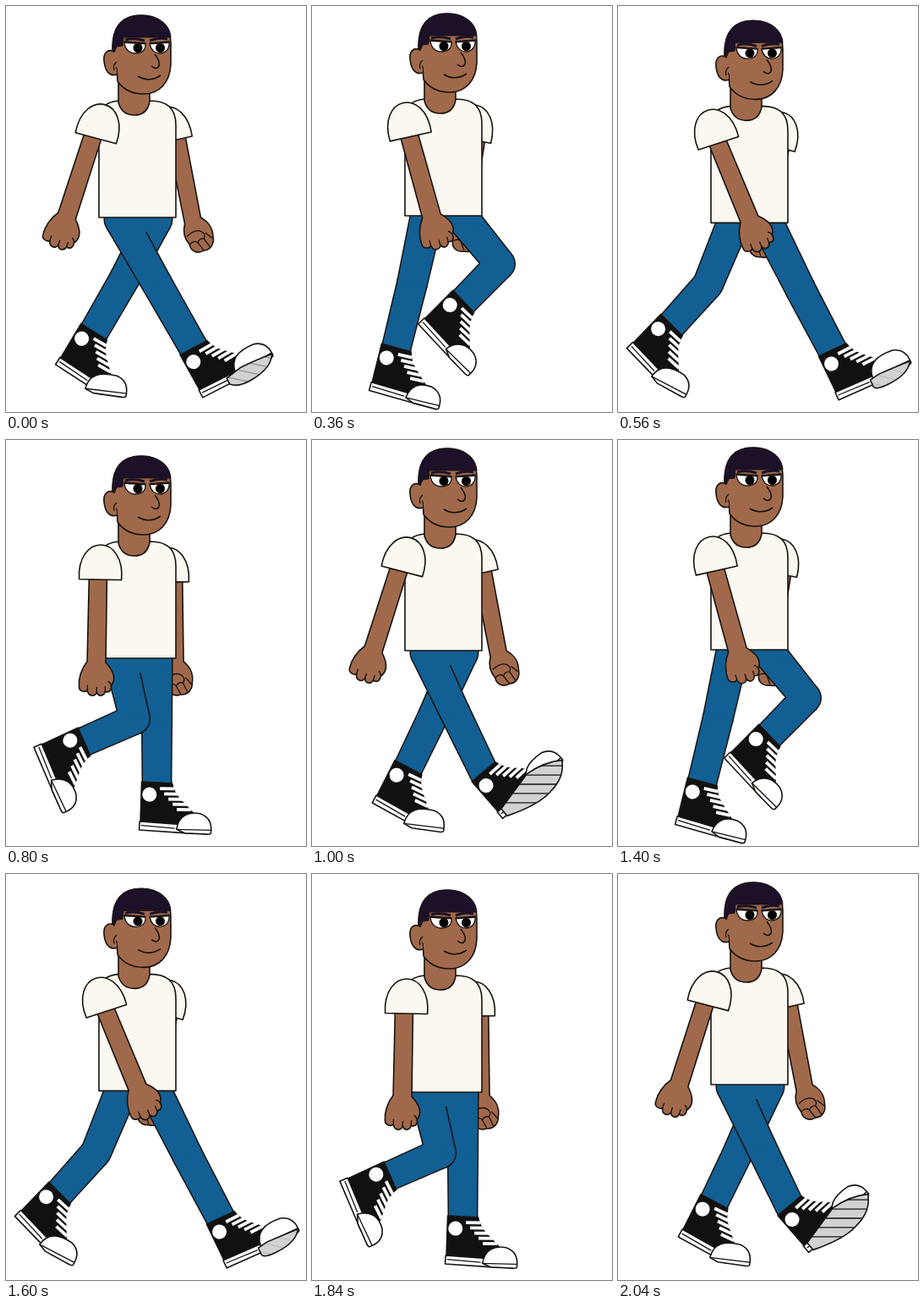
An HTML page with a canvas for the animation above (2080 ms loop, 355x480 px).

```html
<!DOCTYPE html>
<html>
<head>
<meta charset="utf-8">
<title>Walk cycle</title>
<style>
html, body { margin: 0; height: 100%; overflow: hidden; background: #fff; }
canvas { display: block; }
</style>
</head>
<body>
<canvas id="stage" width="355" height="480"></canvas>
<script>
const c = document.getElementById('stage').getContext('2d');
const CYCLE = 1040, STEP = 40, RAD = Math.PI / 180;
const INK = '#17130f', HAIR = '#1c1129', SKIN = '#a1694b',
      CLOTH = '#faf8f0', DENIM = '#125f93', SHOE = '#111', SOLE = '#d2d2d2';

// Leg pose: phase, knee dx, knee y, ankle dx, ankle y, foot angle, toe bend
const LEG = [
  [0, 43, 328, 87, 405, -28, 0],
  [120, 23, 343, 46, 408, -20, 0],
  [280, 1, 333, 1, 406, 3, 0],
  [360, -17, 328, -36, 405, 15, 0],
  [480, -34, 326, -64, 388, 28, 20],
  [520, -37, 322, -74, 386, 32, 24],
  [640, -10, 343, -65, 362, 69, 0],
  [800, 17, 330, -44, 357, 66, 0],
  [880, 45, 305, 1, 350, 46, 0],
  [1000, 34, 323, 68, 393, -40, 0]
];
// Body height over one step
const BOB = [[0, 0], [120, 17.5], [280, 8], [360, -2], [480, -1]];

// Smooth periodic interpolation through the keys
function sample(keys, period, time) {
  const n = keys.length, t = ((time % period) + period) % period;
  let i = n - 1;
  while (keys[i][0] > t) i--;
  const key = j => keys[(j + n) % n];
  const at = j => key(j)[0] + Math.floor(j / n) * period;
  const t0 = at(i), h = at(i + 1) - t0, s = (t - t0) / h;
  const slope = (j, k) => (key(j + 1)[k] - key(j - 1)[k]) / (at(j + 1) - at(j - 1));
  return key(i).slice(1).map((a, m) => {
    const k = m + 1, b = key(i + 1)[k];
    return a + (b - a) * s * s * (3 - 2 * s) +
      h * s * (1 - s) * (slope(i, k) * (1 - s) - slope(i + 1, k) * s);
  });
}

function shape(d, fill, width = 1.6, ink = INK) {
  const p = new Path2D(d);
  if (fill) { c.fillStyle = fill; c.fill(p); }
  if (width) { c.strokeStyle = ink; c.lineWidth = width; c.stroke(p); }
}

function dot(x, y, r, fill) {
  c.beginPath();
  c.arc(x, y, r, 0, 7);
  c.fillStyle = fill;
  c.fill();
}

function posed(x, y, angle, draw) {
  c.save();
  c.translate(x, y);
  c.rotate(angle * RAD);
  draw();
  c.restore();
}

// Tapered tube through joints [x, y, radius]
function tube(joints, grow, fill) {
  joints.forEach(([x, y, r], i) => {
    dot(x, y, r + grow, fill);
    if (!i) return;
    const [px, py, pr] = joints[i - 1];
    const len = Math.hypot(x - px, y - py);
    posed(px, py, Math.atan2(y - py, x - px) / RAD, () => {
      const a = pr + grow, b = r + grow;
      shape(`M0 ${-a}L${len} ${-b}V${b}L0 ${a}Z`, fill, 0);
    });
  });
}

function shoe(angle, bend) {
  const lift = Math.max(0, Math.min(1, (-angle - 6) / 34));
  const curve = lift * lift, early = Math.min(1, 2 * lift);
  const tip = 67 + 8 * Math.max(early, bend / 24);
  shape('M-18-1L18-1Q20 10 30 19L46 34V50H-17Z', SHOE);
  dot(-8, 13.5, 8.5, '#fff');
  let laces = '';
  for (let i = 0; i < 5; i++) laces += `M${4 + 5.3 * i} ${6 + 5.9 * i}l17-.7`;
  shape(laces, null, 3.8, '#fff');
  shape(`M-18 46L30 47L${46 + 16 * early} 51V57L-18 56Z`, '#fff');
  shape('M-16 50.5L24 52', null, 1.3);
  posed(46 + 6 * lift, 55 - 7 * lift, -bend, () => {
    const t = tip - 46;
    shape(`M-20-2C-18-19-6-24 ${t - 14}-22Q${t}-18 ${t}-3V0Q${t} 2 ${t - 5} 2L-10 2Z`, '#fff');
    shape(`M-20-2L${t}-3`, null, 1.3);
  });
  if (lift > 0) {
    const start = 30 - 84 * Math.max(0, lift - .5);
    const d = `M${start} ${55 - 9 * lift}V57Q25 ${57 + 14 * lift} 45 ${58 + 10 * lift}` +
      `Q70 ${58 + 8 * lift} ${tip + 5 * lift} ${51 - 3 * lift}` +
      `Q62 ${54 - 18 * curve} 38 ${54 - 20 * curve}Z`;
    shape(d, SOLE);
    c.save();
    c.clip(new Path2D(d));
    let ribs = '';
    for (let x = -20; x < 70; x += 17) ribs += `M${x} 30l50 42`;
    shape(ribs, null, 1.3 * Math.max(0, 2 * lift - 1));
    c.restore();
  }
}

function leg(hipX, hipY, phase) {
  const [kx, ky, ax, ay, angle, bend] = sample(LEG, CYCLE, phase);
  const joints = [[hipX, hipY, 19.5], [hipX + kx, ky, 18], [hipX + ax, ay, 17.3]];
  tube(joints, .6, INK);
  tube(joints, -.9, DENIM);
  posed(hipX + ax, ay, angle, () => shoe(angle, bend));
}

function sleeve(x, y, angle) {
  posed(x, y, angle, () => shape('M-25 22C-27-4-14-19 0-19S27-4 25 22Z', CLOTH));
}

function nearArm(angle) {
  posed(109.8, 134, angle * 1.22, () => {
    shape('M-11 10L-11 120C-18 129-21 141-20 150C-20 156-12 157-10 154' +
      'C-9 162 0 162 1 156C3 162 10 161 11 155C15 157 19 154 18 148' +
      'C24 140 20 130 11 121L10 10Z', SKIN);
    shape('M-10 154V148M1 156V150M11 155V149M18 148Q17 144 14 143', null, 1.3);
  });
  sleeve(112, 135, angle);
}

function farArm(angle) {
  posed(198.5, 136, angle * .85, () => {
    shape('M-11 10L-10 122C-15 132-13 140-9 147C-9 155-2 160 6 157' +
      'C15 158 20 151 20 143C22 131 17 124 10 118L10 10Z', SKIN);
    shape('M-10 137Q0 130 7 134Q13 138 9 143Q3 142 1 147M-9 147Q-2 142 1 147L6 156' +
      'M9 143L14 154M12 137L19 145', null, 1.3);
  });
  sleeve(191, 138, angle);
}

function torso() {
  shape('M110 250V130Q113 114 133 112Q151 132 170 112C190 112 201 120 201 141V250Z', CLOTH);
}

function head() {
  // neck
  shape('M133 78V114Q137 129 152 129Q167 129 170 113V90Z', SKIN);
  // face, ear and hair
  shape('M126 50C126 22 139 11 160 11C182 11 195 24 195 44V69C194 91 181 104 163 104' +
    'C149 104 139 99 132 89L131 74Q126 70 126 50Z', SKIN);
  shape('M128 54C120 50 115 56 116 65C117 76 122 84 131 81', SKIN);
  shape('M131 66Q126 70 128 76', null, 1.3);
  shape('M126 50C126 22 139 11 160 11C181 11 194 22 195 37L139 37L138 47L131 48L128 55Z', HAIR, 1);
  // eyes
  shape('M140 42L165 44Q166 55 154 56Q141 56 140 42Z', '#fff', 1.3);
  shape('M170 44L193 42Q194 54 183 56Q172 56 170 44Z', '#fff', 1.3);
  dot(156, 49.5, 5.5, '#000');
  dot(182.5, 49.5, 5.5, '#000');
  shape('M140 43L165 44.5M170 44.5L193 43', null, 2);
  shape('M141 40Q151 37 164 41M170 41Q180 37 191 39', null, 3, HAIR);
  // nose and mouth
  shape('M176 57Q183 66 181 71Q178 76 172 71M156 83Q170 91 183 82', null, 1.6);
}

function draw(t) {
  const [bob] = sample(BOB, CYCLE / 2, t);
  const swing = 17 * Math.cos(2 * Math.PI * (t + 10) / CYCLE) - 2;
  const raised = part => posed(0, bob, 0, part);
  c.clearRect(0, 0, 355, 480);
  raised(() => farArm(-.85 * swing));
  leg(177.5, 252 + bob, t + CYCLE / 2);
  leg(135.5, 252 + bob, t);
  raised(() => {
    shape('M117 246H195V258L186 267H128L118 258Z', DENIM, 0);
    torso();
    head();
    nearArm(swing);
  });
}

c.lineCap = 'butt';
c.lineJoin = 'round';
const begin = performance.now();
function tick() {
  const t = Math.max(0, performance.now() - begin);
  draw(Math.floor(t / STEP) * STEP % CYCLE);
  requestAnimationFrame(tick);
}
tick();
</script>
</body>
</html>
```
